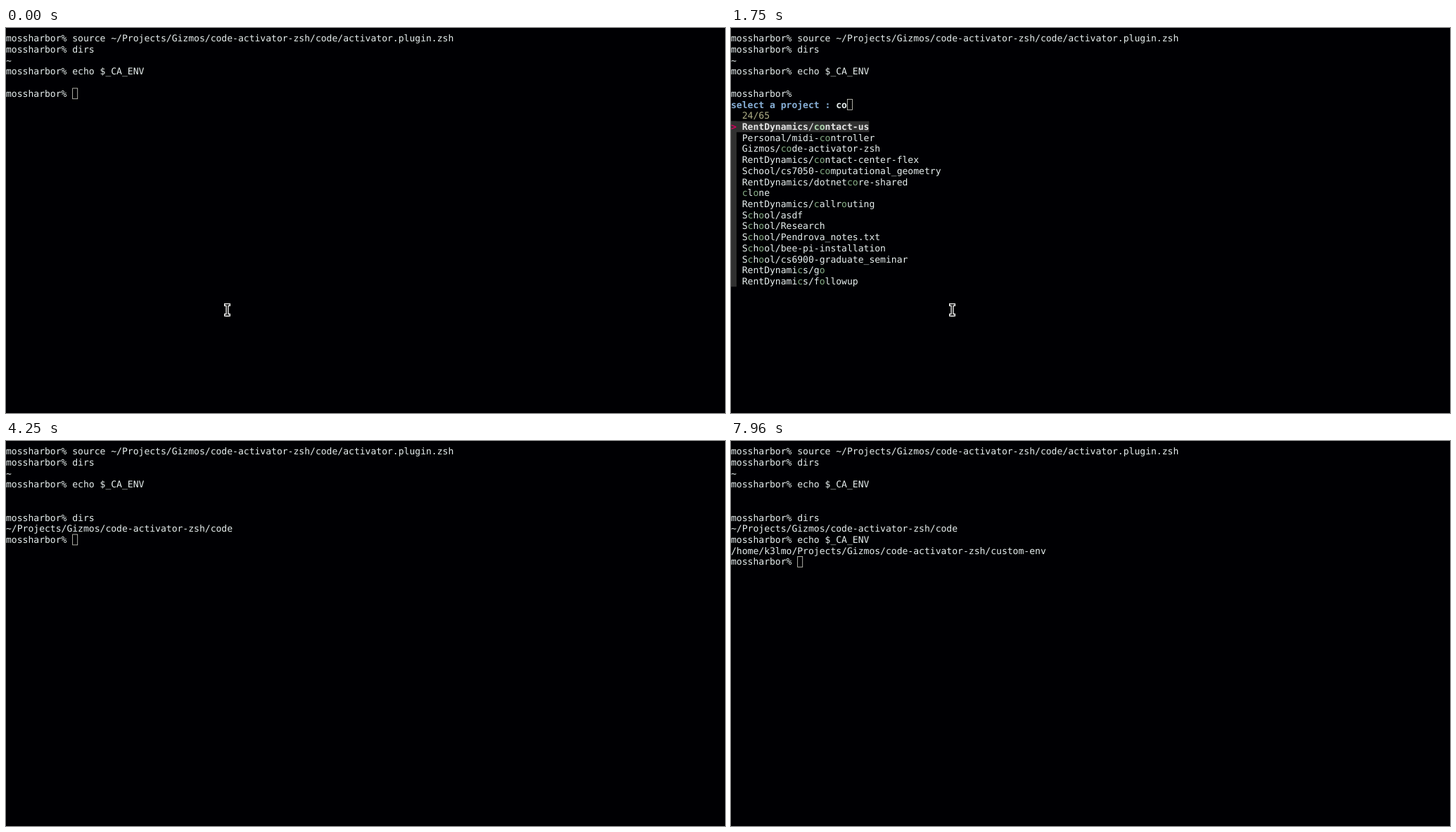
These frames come from a looping animation (1022 by 548 pixels, 8000 ms). An HTML page with a canvas:

```html
<!DOCTYPE html>
<html lang="en">
<head>
<meta charset="utf-8">
<title>Terminal session</title>
<style>
  html, body { margin: 0; width: 100%; height: 100%; overflow: hidden; background: #000003; }
  canvas { display: block; }
</style>
</head>
<body>
<canvas id="stage" width="1022" height="548"></canvas>
<script>
const ctx = document.getElementById('stage').getContext('2d');
const LOOP = 8000;

// Text cells are 12 x 24 units, scaled down to the stage.
const SCALE = 0.6546, CELL_W = 12, CELL_H = 24, TOP = 6.9, BASELINE = 19;
const COLOR = {
  back: '#000003', text: '#e6eeee', cursor: '#dcdcd2', bar: '#303030',
  label: '#87afd7', info: '#afaf87', match: '#87af87',
  matchOn: '#afd7af', textOn: '#e4e4e4', pointer: '#d7005f'
};

const PROMPT = 'mossharbor% ';
const HISTORY = [
  PROMPT + 'source ~/Projects/Gizmos/code-activator-zsh/code/activator.plugin.zsh',
  PROMPT + 'dirs',
  '~',
  PROMPT + 'echo $_CA_ENV'
];
const PROJECTS = [
  'RentDynamics/contact-us', 'Personal/midi-controller',
  'Gizmos/code-activator-zsh', 'RentDynamics/contact-center-flex',
  'School/cs7050-computational_geometry', 'clone',
  'RentDynamics/callrouting', 'RentDynamics/dotnetcore-shared',
  'School/asdf', 'School/Research', 'School/Pendrova_notes.txt',
  'School/bee-pi-installation', 'School/cs6900-graduate_seminar',
  'RentDynamics/go', 'RentDynamics/followup'
];
const TOTAL = 65;
const COUNTS = { '': TOTAL, c: 47, co: 24 };

const AT = {
  picker: 1400, list: 1540, accept: 2390, prompt: 2480, hideMouse: 3000,
  dirs: 3250, dirsDone: 4180, echo: 4950, echoDone: 7000
};
const QUERY = 'code', QUERY_TIMES = [1620, 1710, 1920, 2060];

function write(text, col, row, color = COLOR.text, bold = false) {
  ctx.font = `${bold ? 'bold ' : ''}20px "DejaVu Sans Mono", monospace`;
  ctx.fillStyle = color;
  [...text].forEach((ch, i) => {
    if (ch !== ' ') ctx.fillText(ch, (col + i) * CELL_W, row * CELL_H + BASELINE);
  });
}

function block(col, row, cols, rows) {
  ctx.fillStyle = COLOR.bar;
  ctx.fillRect(col * CELL_W, row * CELL_H, cols * CELL_W, rows * CELL_H);
}

function cursor(col, row) {
  ctx.strokeStyle = COLOR.cursor;
  ctx.lineWidth = 1.2;
  ctx.strokeRect(col * CELL_W + 0.6, row * CELL_H + 0.6, CELL_W - 1.2, CELL_H - 1.2);
}

function typed(text, t, start, step) {
  const n = Math.floor((t - start) / step) + 1;
  return text.slice(0, Math.max(0, n));
}

function inputLine(text, row) {
  write(PROMPT + text, 0, row);
  cursor(PROMPT.length + text.length, row);
}

// Fuzzy match: scan forward for the end, then back for the shortest span.
function findMatch(name, query) {
  const lower = name.toLowerCase();
  const whole = lower.indexOf(query);
  if (whole >= 0) return [...query].map((_, i) => whole + i);
  let pos = -1;
  for (const ch of query) {
    pos = lower.indexOf(ch, pos + 1);
    if (pos < 0) return null;
  }
  const hits = [];
  pos++;
  for (const ch of [...query].reverse()) {
    pos = lower.lastIndexOf(ch, pos - 1);
    hits.unshift(pos);
  }
  return hits;
}

function drawPicker(query) {
  const label = 'select a project : ';
  write(label, 0, 6, COLOR.label, true);
  write(query, label.length, 6, COLOR.text, true);
  cursor(label.length + query.length, 6);

  const isWhole = item => Number(item.name.includes(query));
  const items = PROJECTS.map(name => ({ name, hits: findMatch(name, query) }))
    .filter(item => item.hits)
    .sort((a, b) => isWhole(b) - isWhole(a));
  write(`${COUNTS[query] ?? items.length}/${TOTAL}`, 2, 7, COLOR.info);

  block(0, 8, 1, items.length);
  items.forEach(({ name, hits }, i) => {
    const row = 8 + i, on = i === 0;
    if (on) {
      block(0, row, name.length + 2, 1);
      write('>', 0, row, COLOR.pointer, true);
    }
    [...name].forEach((ch, k) => {
      const hit = hits.includes(k);
      const color = on ? (hit ? COLOR.matchOn : COLOR.textOn)
                       : (hit ? COLOR.match : COLOR.text);
      write(ch, 2 + k, row, color, on);
    });
  });
}

function drawMouse() {
  const beam = (color, inset) => {
    ctx.fillStyle = color;
    const bar = (x, y, w, h) =>
      ctx.fillRect(x + inset, y + inset, w - 2 * inset, h - 2 * inset);
    bar(310, 392, 9, 4);
    bar(310, 406.5, 9, 4);
    bar(312.4, 392, 4.2, 18.5);
  };
  beam('#ffffff', 0);
  beam('#000000', 1.3);
}

function drawSession(t) {
  HISTORY.forEach((line, row) => write(line, 0, row));
  if (t < AT.picker) return inputLine('', 5);
  if (t < AT.accept) {
    write(PROMPT, 0, 5);
    if (t < AT.list) return cursor(0, 6);
    return drawPicker(QUERY.slice(0, QUERY_TIMES.filter(at => t >= at).length));
  }
  if (t < AT.prompt) return cursor(0, 5);
  if (t < AT.dirsDone) return inputLine(typed('dirs', t, AT.dirs, 130), 6);

  write(PROMPT + 'dirs', 0, 6);
  write('~/Projects/Gizmos/code-activator-zsh/code', 0, 7);
  const command = 'echo $_CA_ENV';
  if (t < AT.echoDone) return inputLine(typed(command, t, AT.echo, 120), 8);

  write(PROMPT + command, 0, 8);
  write('/home/k3lmo/Projects/Gizmos/code-activator-zsh/custom-env', 0, 9);
  inputLine('', 10);
}

function render(now) {
  const t = now % LOOP;
  ctx.setTransform(1, 0, 0, 1, 0, 0);
  ctx.fillStyle = COLOR.back;
  ctx.fillRect(0, 0, 1022, 548);
  if (t < AT.hideMouse) drawMouse();
  ctx.setTransform(SCALE, 0, 0, SCALE, 0, TOP);
  ctx.textRendering = 'geometricPrecision';
  drawSession(t);
}

function tick() {
  render(performance.now());
  requestAnimationFrame(tick);
}
tick();
</script>
</body>
</html>
```
